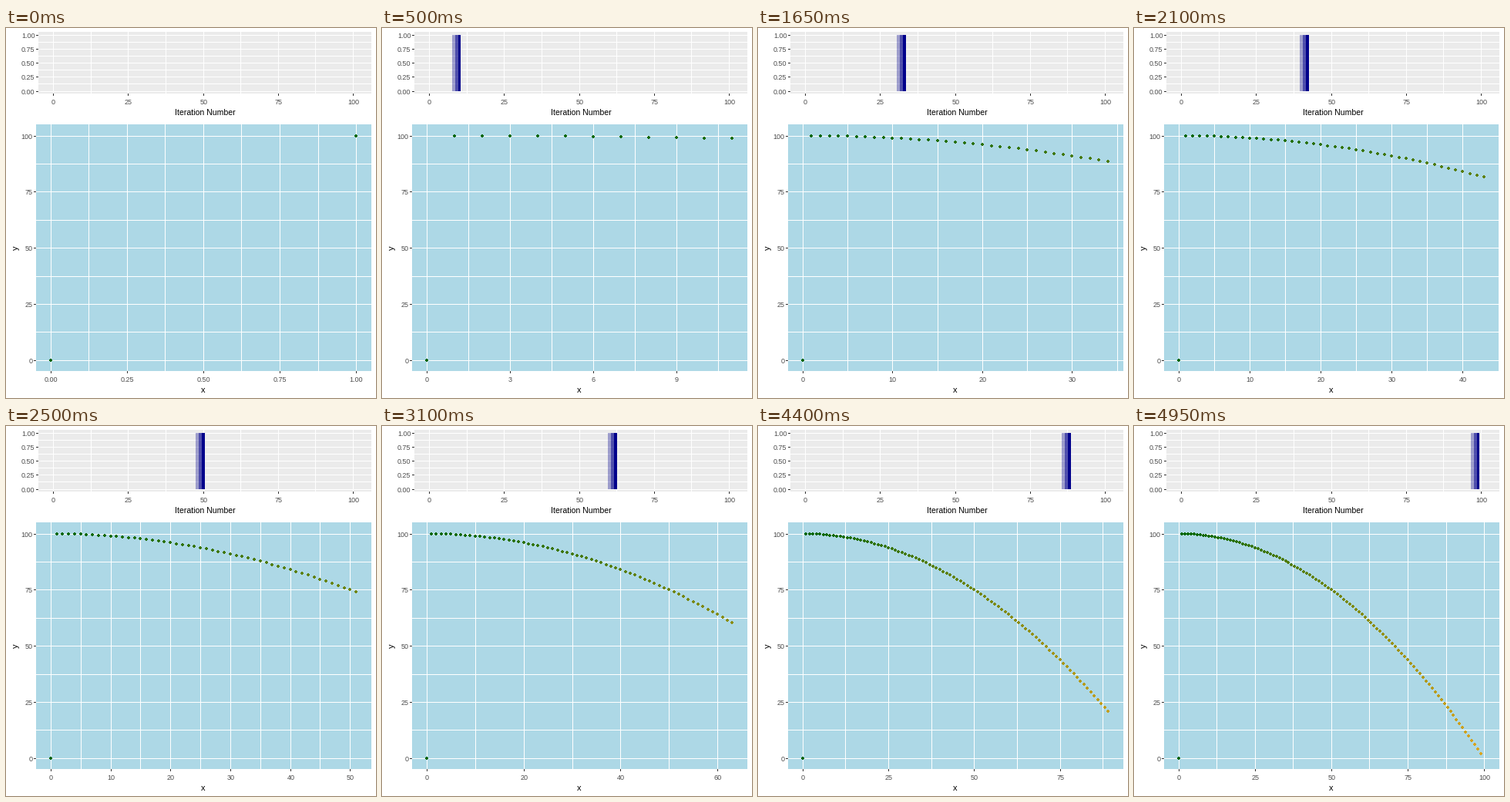
A matplotlib script that plays this animation: 480 by 480 pixels, repeating every 5 s.

```python
import math

import matplotlib.pyplot as plt
import numpy as np
from matplotlib.animation import FuncAnimation
from matplotlib.collections import PolyCollection

SIZE, DPI = 480, 72
FRAMES, INTERVAL = 100, 50
RIGHT = 474
GREY, TICK = "#4D4D4D", "#333333"
DARK_GREEN = np.array([0, 100, 0]) / 255
GOLDENROD = np.array([218, 165, 32]) / 255
DARK_BLUE = np.array([0, 0, 139]) / 255

plt.rcParams["font.family"] = "Liberation Sans"


def nice_breaks(lo, hi, m=5):
    """Extended Wilkinson tick search, limited to the visible range."""
    nice = [1, 5, 2, 2.5, 4, 3]
    span = hi - lo
    best, found = -2, (lo, hi, span)

    def total(simple, cover, dense):
        return 0.25 * simple + 0.2 * cover + 0.5 * dense + 0.05

    def search():
        nonlocal best, found
        j = 1
        while True:
            for i, q in enumerate(nice):
                simple_max = 2 - i / 5 - j
                if total(simple_max, 1, 1) < best:
                    return
                k = 2
                while True:
                    dense_max = 2 - (k - 1) / (m - 1) if k >= m else 1
                    if total(simple_max, 1, dense_max) < best:
                        break
                    z = math.ceil(math.log10(span / (k + 1) / j / q))
                    while True:
                        step = j * q * 10.0 ** z
                        width = step * (k - 1)
                        half = max(0, (width - span) / 2)
                        cover_max = 1 - (half / (0.1 * span)) ** 2
                        if total(simple_max, cover_max, dense_max) < best:
                            break
                        first = (math.floor(hi / step) - (k - 1)) * j
                        last = math.ceil(lo / step) * j
                        for start in range(first, last + 1):
                            a = start * step / j
                            b = a + width
                            has_zero = start % j == 0 and a <= 0 <= b
                            simple = 1 - i / 5 - j + has_zero
                            cover = 1 - 0.5 * ((hi - b) ** 2 + (lo - a) ** 2) / (0.1 * span) ** 2
                            ratio = (k - 1) / width * (max(b, hi) - min(a, lo)) / (m - 1)
                            score = total(simple, cover, 2 - max(ratio, 1 / ratio))
                            if score > best:
                                best, found = score, (a, b, step)
                        z += 1
                    k += 1
            j += 1

    search()
    a, b, step = found
    ticks = a + step * np.arange(round((b - a) / step) + 1)
    ticks = ticks[(ticks >= lo - 1e-9) & (ticks <= hi + 1e-9)]
    return ticks, step


def tick_labels(ticks):
    digits = next(d for d in range(6) if np.allclose(np.round(ticks, d), ticks, atol=1e-9))
    return [f"{abs(t):.{digits}f}" for t in ticks]


def rect(x0, y0, x1, y1):
    return [(x0, y0), (x1, y0), (x1, y1), (x0, y1)]


def v_line(x, y0, y1):
    return rect(int(x), y0, int(x) + 1, y1)


def h_line(y, x0, x1):
    return rect(x0, int(y), x1, int(y) + 1)


def dot(x, y):
    """Four pixel disc: a square without its corner pixels."""
    x, y = int(x), int(y)
    quarter = [(2, -1), (2, 1), (1, 1), (1, 2), (-1, 2), (-1, 1),
               (-2, 1), (-2, -1), (-1, -1), (-1, -2), (1, -2), (1, -1)]
    return [(x + dx, y + dy) for dx, dy in quarter]


fig = plt.figure(figsize=(SIZE / DPI, SIZE / DPI), dpi=DPI, facecolor="white")
ax = fig.add_axes([0, 0, 1, 1])
ax.set_xlim(0, SIZE)
ax.set_ylim(SIZE, 0)
ax.axis("off")


def shapes(verts, color):
    group = PolyCollection(verts, facecolors=color, edgecolors="none",
                           linewidths=0, antialiaseds=False)
    ax.add_collection(group, autolim=False)
    return group


def label(x, y, text, ha="center", size=9, color=GREY, **kw):
    return ax.text(x, y, text, ha=ha, va=kw.pop("va", "baseline"),
                   fontsize=size, color=color, **kw)


def top_x(v):
    return 61.63 + 3.888 * v


def top_y(v):
    return 82.05 - 72.73 * v


def main_x(v, n):
    return 58.3 + 396.3 * v / n


def main_y(v):
    return 431.1 - 2.909 * v


def y_axis(left, top, bottom, pos, ticks, text_x):
    """Horizontal grid, tick marks and labels of one panel."""
    step = ticks[1] - ticks[0]
    values = np.arange(ticks[0], ticks[-1] + step / 4, step / 2)
    shapes([h_line(pos(v), left, RIGHT) for v in values], "white")
    shapes([h_line(pos(v), left - 3, left) for v in ticks], TICK)
    for v, text in zip(ticks, tick_labels(ticks)):
        label(text_x, int(pos(v)) + 4, text, ha="right")


# Progress strip
shapes([rect(42, 5, RIGHT, 85)], "#EBEBEB")
shapes([v_line(top_x(v), 5, 85) for v in np.arange(0, 101, 12.5)], "white")
y_axis(42, 5, 85, top_y, np.linspace(0, 1, 5), 37.5)
strip_ticks = np.arange(0, 101, 25)
shapes([v_line(top_x(v), 85, 88) for v in strip_ticks], TICK)
for v in strip_ticks:
    label(int(top_x(v)) + 0.5, 99, str(v))
label(258, 113, "Iteration Number", size=10.5, color="black")
bars = shapes([], DARK_BLUE)

# Main plot
shapes([rect(39, 125, RIGHT, 445)], "#ADD8E6")
grid = shapes([], "white")
y_axis(39, 125, 445, main_y, np.arange(0, 101, 25), 34.7)
marks = shapes([], TICK)
dots = shapes([], DARK_GREEN)
names = [label(0, 459, "") for _ in range(12)]
label(256, 473, "x", size=11, color="black")
label(12.5, 285.5, "y", size=11, color="black", va="center", rotation=90)

mix = np.linspace(0, 1, 100)[:, None]
ramp = DARK_GREEN * (1 - mix) + GOLDENROD * mix


def update(k):
    # Bar with a two step fading wake; a bar at zero is out of bounds
    verts, colors = [], []
    for back in (2, 1, 0):
        x = k - back
        if x >= 1:
            x0, x1 = round(top_x(x - 0.5)), round(top_x(x + 0.5))
            verts.append(rect(x0, 9, x1, 82))
            colors.append((*DARK_BLUE, 1 - back / 3))
    bars.set_verts(verts)
    bars.set_facecolor(colors if colors else "none")

    n = k + 1
    lo, hi = -0.05 * n, 1.05 * n
    ticks, step = nice_breaks(lo, hi)
    minor = np.append(ticks - step / 2, ticks[-1] + step / 2)
    minor = minor[(minor > lo) & (minor < hi)]
    grid.set_verts([v_line(main_x(v, n), 125, 445) for v in (*minor, *ticks)])
    marks.set_verts([v_line(main_x(v, n), 445, 448) for v in ticks])

    for name in names:
        name.set_text("")
    for name, v, text in zip(names, ticks, tick_labels(ticks)):
        name.set_text(text)
        name.set_x(int(main_x(v, n)) + 0.5)

    # The ramp holds 100 colours, so the point at x = 100 stays hidden
    xs = np.arange(min(n, 99) + 1)
    ys = np.where(xs == 0, 0, 100 - xs ** 2 / 100)
    dots.set_verts([dot(main_x(x, n), main_y(y)) for x, y in zip(xs, ys)])
    dots.set_facecolor(ramp[:len(xs)])
    return bars, grid, marks, dots, *names


anim = FuncAnimation(fig, update, frames=FRAMES, interval=INTERVAL,
                     repeat=True, repeat_delay=0, blit=False)
plt.show()
```
